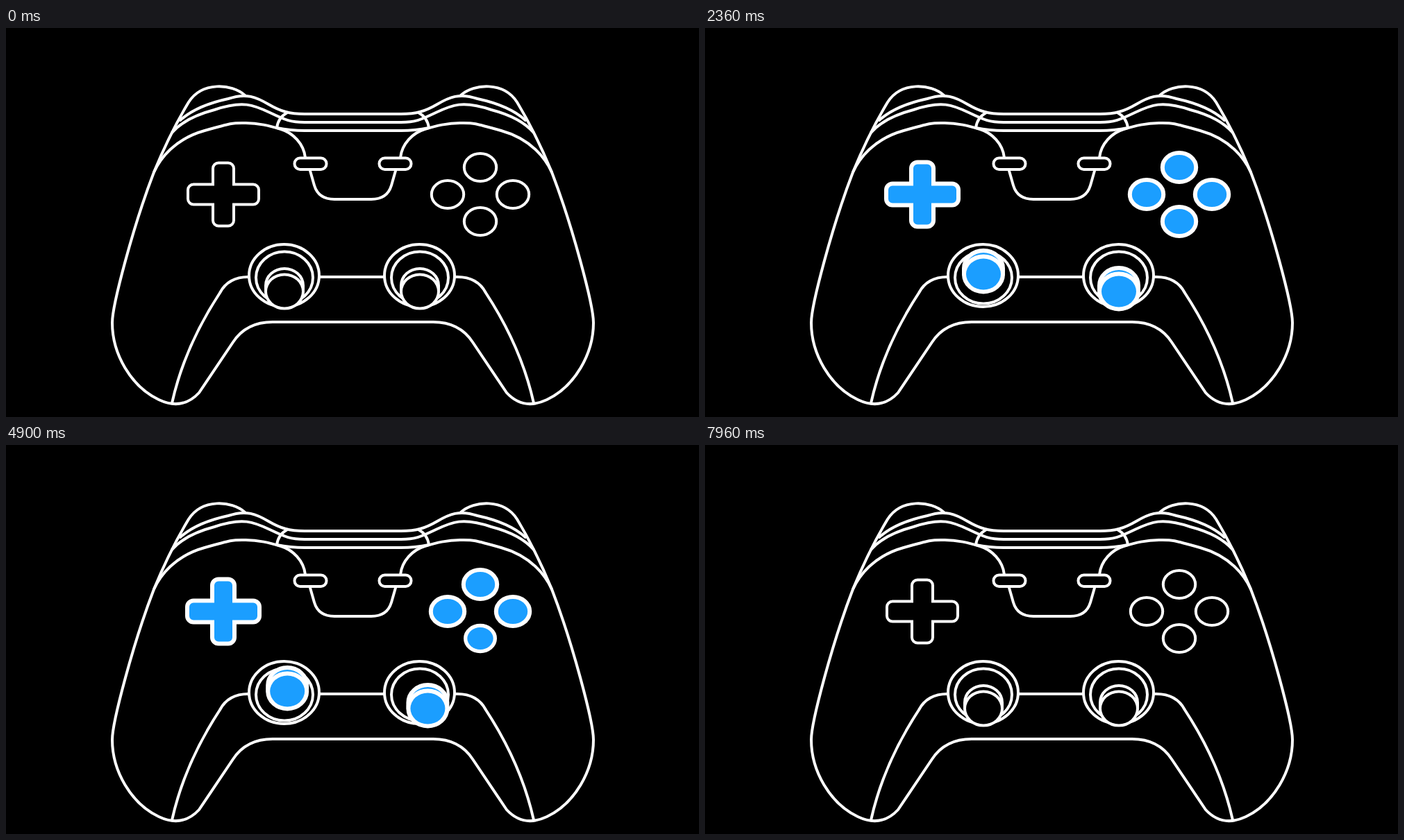
An HTML page for the animation above (8480 ms loop, 998 by 561 pixels).

```html
<!DOCTYPE html>
<html lang="en">
<head>
<meta charset="utf-8">
<title>Game controller</title>
<style>
html, body { margin: 0; width: 100%; height: 100%; overflow: hidden; background: #000; }
svg { display: block; width: 998px; height: 561px; }
.line { fill: none; stroke: #fff; stroke-width: 4; stroke-linecap: round; stroke-linejoin: round; }
.solid { fill: #000; stroke: #fff; stroke-width: 4; }
.lit { stroke: #fff; stroke-linejoin: round; paint-order: stroke; }
</style>
</head>
<body>
<svg viewBox="0 0 998 561">
  <defs>
    <g id="half" class="line">
      <!-- outer shell -->
      <path d="M344 97C325 80 282 77 263 107Q236 152 213 208C183 286 153 400 153 425C153 470 180 517 220 536Q254 552 278 526L327 453Q346 424 384 424H500"/>
      <!-- bumper -->
      <path d="M251 133Q274 112 320 102C346 93 361 100 378 110S408 124 430 124H500"/>
      <path d="M239 151Q258 129 300 118C341 104 357 111 380 122S410 136 430 136H500"/>
      <path d="M405 122Q392 129 390 144Q410 148 430 148H500"/>
      <!-- face plate and grip -->
      <path d="M213 208C222 188 243 160 286 148S326 137 345 137S379 141 396 146S429 167 431 187M438 206L444 227Q450 247 473 247H500"/>
      <path d="M239 541Q257 460 308 382Q320 359 349 359H500"/>
    </g>
  </defs>
  <use href="#half"/>
  <use href="#half" transform="translate(999) scale(-1 1)"/>
  <g id="base"></g>
  <g id="parts"></g>
</svg>
<script>
const LOOP = 8480;
const REACH = 15.5, LIFT = 25;
const base = document.getElementById('base');
const parts = document.getElementById('parts');
const litShapes = [];

function add(parent, tag, attrs) {
  const el = document.createElementNS('http://www.w3.org/2000/svg', tag);
  for (const key in attrs) el.setAttribute(key, attrs[key]);
  parent.appendChild(el);
  return el;
}

// The stroke lies below the fill, so a wider one only grows outwards
function lit(parent, tag, attrs) {
  litShapes.push(add(parent, tag, { ...attrs, class: 'lit' }));
}

// Rounded rectangle around the origin, from half sizes
function roundRect(w, h, r) {
  const corner = (x, y) => `a${r} ${r} 0 0 1 ${x * r} ${y * r}`;
  return `M${r - w} ${-h}H${w - r}${corner(1, 1)}V${h - r}${corner(-1, 1)}` +
    `H${r - w}${corner(-1, -1)}V${r - h}${corner(1, -1)}Z`;
}

function makeStick(x) {
  add(base, 'ellipse', { class: 'solid', cx: x, cy: 357, rx: 50.5, ry: 45 });
  add(base, 'ellipse', { class: 'solid', cx: x + .5, cy: 360, rx: 41, ry: 37.5 });
  const g = add(parts, 'g', {});
  lit(g, 'rect', { x: x - 24.5, y: 349, width: 50, height: 50, rx: 25, ry: 22.5 });
  lit(g, 'ellipse', { cx: x + .5, cy: 380, rx: 25, ry: 22.5 });
  return g;
}

for (const side of [-1, 1]) {
  add(base, 'rect', { class: 'solid', x: 476.5 + 61 * side, y: 187.5, width: 46, height: 16.5, rx: 8 });
}
const leftStick = makeStick(400.5);
const rightStick = makeStick(595.5);

lit(parts, 'path', { d: roundRect(49, 12.5, 6) + roundRect(13, 43.5, 6), transform: 'translate(313 240)' });

// Pressed one after another, clockwise from the right
const buttons = [0, 1, 2, 3].map(i => {
  const a = i * Math.PI / 2;
  const g = add(parts, 'g', {});
  lit(g, 'ellipse', { rx: 21.2, ry: 18 });
  return { g, x: 683 + 47 * Math.cos(a), y: 240 + 39 * Math.sin(a), time: 4120 + 893 * i };
});

// Eased step from 0 to 1
function ease(t, from, to) {
  const p = Math.min(1, Math.max(0, (t - from) / (to - from)));
  return p * p * (3 - 2 * p);
}

// Smooth hump of height 1
function hump(t, centre, reach) {
  const d = Math.min(1, Math.abs(t - centre) / reach);
  return (1 + Math.cos(Math.PI * d)) / 2;
}

function move(el, x, y, scale = 1) {
  el.setAttribute('transform', `translate(${x} ${y}) scale(${scale})`);
}

function draw(t) {
  const on = ease(t, 280, 800) - ease(t, 7440, 7960);
  const border = 4 + 2 * on + hump(t, 880, 600);
  for (const el of litShapes) {
    el.setAttribute('fill', `rgb(${27 * on},${158 * on},${255 * on})`);
    el.setAttribute('stroke-width', 2 * border);
  }

  const home = ease(t, 5720, 6500);
  const leftX = 2 * ease(t, 4180, 5400) - ease(t, 2820, 3660) - home;
  const leftY = home - ease(t, 1700, 2340);
  const rightX = ease(t, 3920, 4700) - 2 * ease(t, 4700, 5580) + home;
  move(leftStick, REACH * leftX, LIFT * leftY);
  move(rightStick, REACH * rightX, 0);

  for (const b of buttons) move(b.g, b.x, b.y, 1 - .17 * hump(t, b.time, 300));
}

const start = performance.now();
function tick() {
  draw((performance.now() - start) % LOOP);
  requestAnimationFrame(tick);
}
tick();
</script>
</body>
</html>
```
